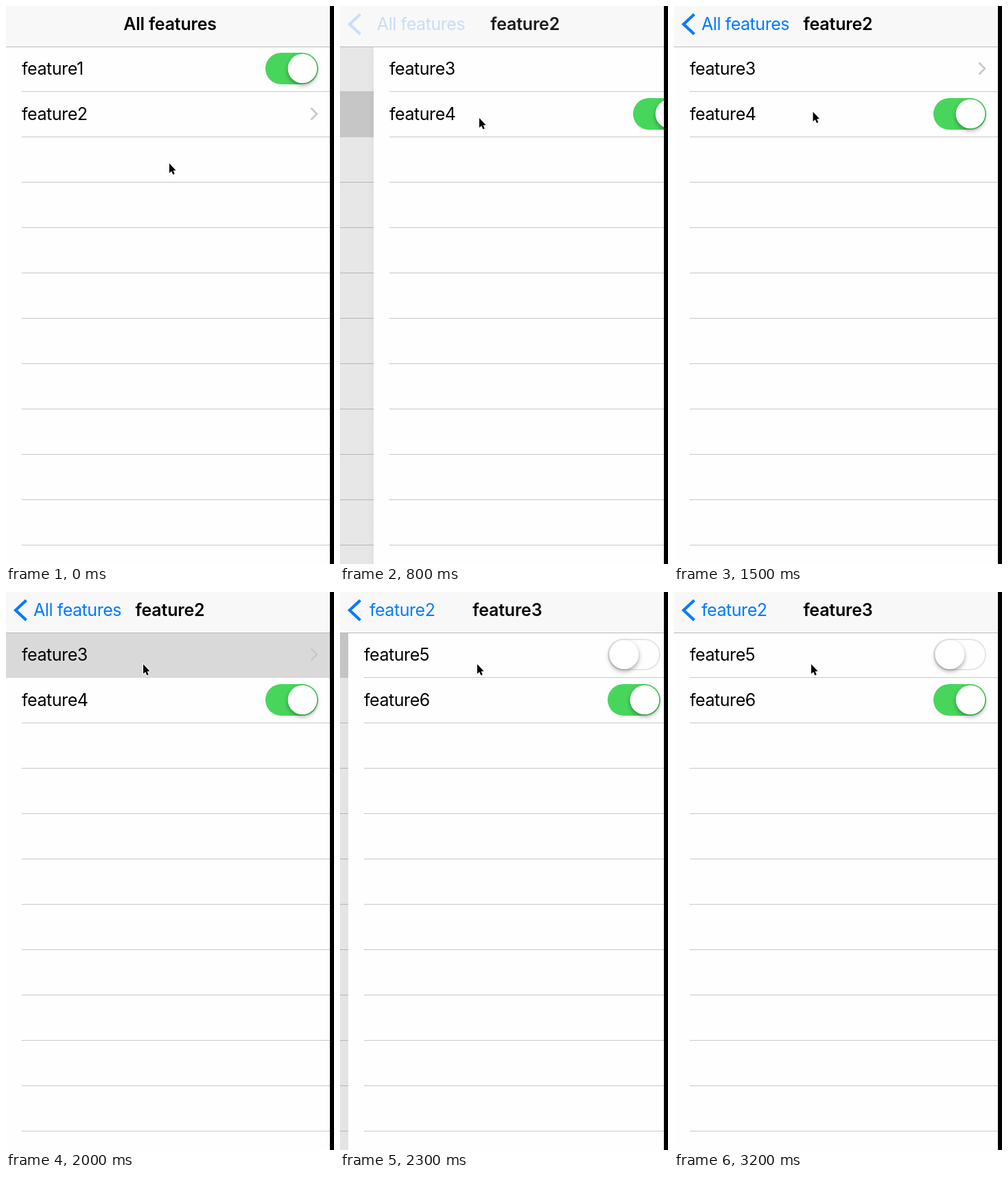
An HTML page with a canvas for the animation above (3500 ms loop, 478 by 812 pixels).

```html
<!DOCTYPE html>
<html lang="en">
<head>
<meta charset="utf-8">
<title>Feature list</title>
<style>
  html, body { margin: 0; width: 478px; height: 812px; overflow: hidden; background: #000; }
  canvas { display: block; }
</style>
</head>
<body>
<canvas id="stage" width="478" height="812"></canvas>
<script>
const ctx = document.getElementById('stage').getContext('2d');
const LOOP = 3500, STEP = 100;
const W = 472, H = 812, BAR = 59, ROW = 66, MARGIN = 23, MID = 239;
const BLUE = [0, 122, 255], INK = '#000', LINE = '#c8c7cc';
const FACE = 'Inter, "Open Sans", sans-serif';

const pages = [
  { title: 'All features', rows: [['feature1', 'on'], ['feature2', 'link']] },
  { title: 'feature2', rows: [['feature3', 'link'], ['feature4', 'on']] },
  { title: 'feature3', rows: [['feature5', 'off'], ['feature6', 'on']] }
];
// tap: row lights up; go: the push spring starts
const pushes = [{ tap: 600, go: 592 }, { tap: 2000, go: 2002 }];

const clamp = v => Math.min(1, Math.max(0, v));
const smooth = v => { v = clamp(v); return v * v * (3 - 2 * v); };
// blue darkened towards black by the share k
const shade = k => `rgb(${BLUE.map(c => Math.round(c * (1 - k)))})`;

// critically damped spring: 1 at the start, 0 at rest
function spring(ms) {
  if (ms < 20) return 1;
  const a = ms / 1000 * 18.5;
  return (1 + a) * Math.exp(-a);
}

// bold runs from 0 (regular) to 1 (semibold)
function setFont(bold) {
  ctx.font = Math.round(400 + 200 * bold) + ' 25px ' + FACE;
  ctx.letterSpacing = -0.45 + 0.25 * bold + 'px';
}

function text(str, x, y, color, bold = 0, alpha = 1) {
  if (alpha <= 0) return;
  setFont(bold);
  ctx.globalAlpha = alpha;
  ctx.fillStyle = color;
  ctx.fillText(str, x, y);
  ctx.globalAlpha = 1;
}

function titleLeft(str) {
  setFont(1);
  return MID - ctx.measureText(str).width / 2;
}

function stroke(points, color, width) {
  ctx.beginPath();
  points.forEach(([x, y]) => ctx.lineTo(x, y));
  ctx.strokeStyle = color;
  ctx.lineWidth = width;
  ctx.stroke();
}

function toggle(x, y, on) {
  ctx.beginPath();
  if (on) {
    ctx.roundRect(x + 378, y - 23, 77, 46, 23);
    ctx.fillStyle = '#47d65b';
    ctx.fill();
  } else {
    ctx.roundRect(x + 379, y - 22, 75, 44, 22);
    ctx.strokeStyle = '#e6e6e6';
    ctx.lineWidth = 2;
    ctx.stroke();
  }
  ctx.save();
  ctx.shadowColor = 'rgba(0,0,0,.35)';
  ctx.shadowBlur = 6;
  ctx.shadowOffsetY = 3;
  ctx.beginPath();
  ctx.arc(x + (on ? 432 : 402), y, 21.3, 0, Math.PI * 2);
  ctx.fillStyle = '#fff';
  ctx.fill();
  ctx.restore();
}

function drawPage(page, x, lit) {
  ctx.fillStyle = '#fefefe';
  ctx.fillRect(x, BAR, W, H - BAR);
  ctx.fillStyle = LINE;
  for (let y = 124; y < H; y += ROW) ctx.fillRect(x + MARGIN, y, W - MARGIN, 1);
  page.rows.forEach(([label, kind], i) => {
    const y = 91 + i * ROW, link = kind === 'link';
    if (link && lit) {
      ctx.fillStyle = '#d9d9d9';
      ctx.fillRect(x, y - 33, W, 67);
    }
    text(label, x + MARGIN, y + 9, INK);
    if (link) {
      stroke([[x + 444.5, y - 8.5], [x + 453, y], [x + 444.5, y + 8.5]], LINE, 2.6);
    } else {
      toggle(x, y, kind === 'on');
    }
  });
}

function drawBar(k, p, ms) {
  const q = 1 - p, first = k === 0;
  const fade = first ? clamp((ms - 150) / 300) : 1;
  const name = pages[k].title, next = pages[k + 1].title;
  ctx.fillStyle = '#f8f8f8';
  ctx.fillRect(0, 0, W, BAR);
  ctx.fillStyle = '#b8b8ba';
  ctx.fillRect(0, BAR, W, 1);

  ctx.save();
  ctx.beginPath();
  ctx.rect(27, 0, W - 27, BAR);
  ctx.clip();
  if (!first) text(pages[k - 1].title, 40 - 152 * q, 35, shade(0), 0, 1 - 1.4 * q);
  // the old title slides over and becomes the back label
  const rest = p === 1 ? 1 : clamp(1.12 * p - 0.01);
  const x = 40 + (titleLeft(name) - 40) * rest;
  text(name, x, 35, shade(p), p, first ? Math.max(fade, p * p) : 1 - 1.5 * p * q);
  text(next, titleLeft(next) + Math.max(0, 335 * p - 4), 35, INK, 1, q);
  ctx.restore();

  ctx.globalAlpha = fade;
  stroke([[29.5, 12], [14, 26.5], [29.5, 41]], shade(0), 4.2);
  ctx.globalAlpha = 1;
}

function drawCursor(t) {
  const a = smooth(t / 400), b = smooth((t - 1400) / 400);
  ctx.save();
  ctx.translate(238 - 35 * a - 3 * b, 229 - 66 * a - 58 * b);
  ctx.beginPath();
  [[0, 0], [0, 14], [3.2, 11.2], [5.4, 16.2], [7.8, 15.2], [5.6, 10.4], [9.6, 10.2]]
    .forEach(([x, y]) => ctx.lineTo(x, y));
  ctx.closePath();
  ctx.lineJoin = 'round';
  ctx.lineWidth = 2;
  ctx.strokeStyle = '#fff';
  ctx.stroke();
  ctx.fillStyle = '#000';
  ctx.fill();
  ctx.restore();
}

function draw(t) {
  const k = t < pushes[1].tap ? 0 : 1;
  const ms = t - pushes[k].go, p = spring(ms);
  const x = Math.round(W * p);
  ctx.fillStyle = '#000';
  ctx.fillRect(0, 0, 478, H);
  ctx.save();
  ctx.beginPath();
  ctx.rect(0, 0, W, H);
  ctx.clip();
  if (x > 0) drawPage(pages[k], Math.round((x - W) * 0.305), t >= pushes[k].tap);
  if (x < W) {
    ctx.fillStyle = `rgba(0,0,0,${0.1 * (1 - p)})`;
    ctx.fillRect(0, BAR, x, H - BAR);
    const edge = ctx.createLinearGradient(x - 9, 0, x, 0);
    edge.addColorStop(0, 'rgba(0,0,0,0)');
    edge.addColorStop(1, `rgba(0,0,0,${0.25 * p})`);
    ctx.fillStyle = edge;
    ctx.fillRect(x - 9, BAR, 9, H - BAR);
    drawPage(pages[k + 1], x, false);
  }
  drawBar(k, p, ms);
  drawCursor(t);
  ctx.restore();
}

const origin = performance.now();
function tick() {
  const t = (performance.now() - origin) % LOOP;
  draw(Math.floor(t / STEP) * STEP);
  requestAnimationFrame(tick);
}
tick();
</script>
</body>
</html>
```
